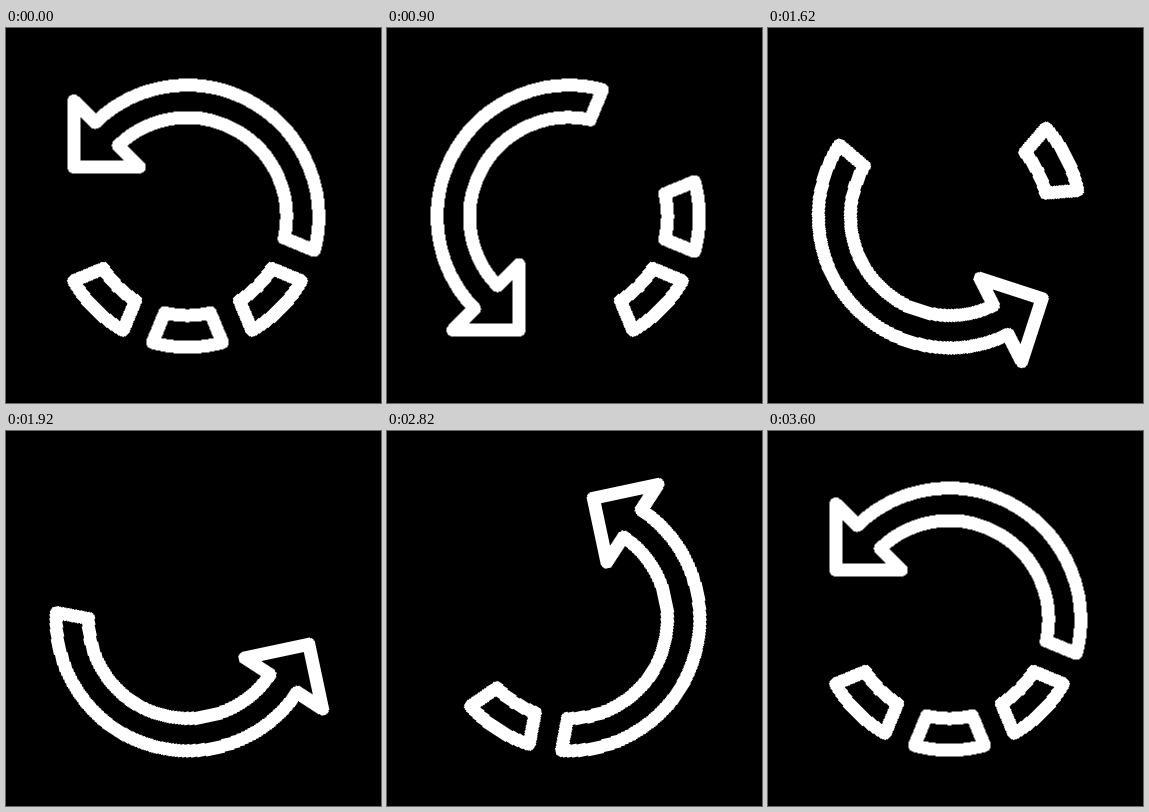
These frames come from a looping animation (375 px wide and 375 px high, 3.63 s). An HTML page:

```html
<!DOCTYPE html>
<html lang="en">
<head>
<meta charset="utf-8">
<title>Rotating arrow</title>
<style>
  html, body { margin: 0; width: 100%; height: 100%; overflow: hidden; background: #000; }
  svg { display: block; width: 100%; height: 100%; }
  path { fill: none; stroke: #fff; stroke-width: 13; stroke-linejoin: round; shape-rendering: crispEdges; }

  /* 120 turns of 3 degrees, 30 ms each, plus one rest step */
  .wheel { transform-origin: 0 0; animation: turn 3.63s steps(121) -2ms infinite; }
  .dash { animation: 3.63s step-end -2ms infinite; }
  .first { animation-name: first; }
  .second { animation-name: second; }
  .third { animation-name: third; }

  @keyframes turn { from { transform: rotate(0deg); } to { transform: rotate(-363deg); } }
  @keyframes first { 0%, 67.769% { opacity: 1; } 19.835% { opacity: 0; } 100% { opacity: 1; } }
  @keyframes second { 0%, 81.818% { opacity: 1; } 35.537% { opacity: 0; } 100% { opacity: 1; } }
  @keyframes third { 0%, 96.694% { opacity: 1; } 51.24% { opacity: 0; } 100% { opacity: 1; } }
</style>
</head>
<body>
<svg viewBox="0 0 375 375">
  <defs>
    <path id="dash" d="M-35 126A130.8 130.8 0 0 0 35 126L22.8 96.4A99 99 0 0 1-22.8 96.4Z"/>
  </defs>
  <g transform="translate(181.5 188.5)">
    <g class="wheel">
      <path d="M-113.5-115.5L-92.1-93.9A131.5 131.5 0 0 1 126.8 34L96.8 21.5A99.2 99.2 0 0 0-69.2-70.9L-48-49.5H-113.5Z"/>
      <use class="dash first" href="#dash" transform="rotate(-45)"/>
      <use class="dash second" href="#dash"/>
      <use class="dash third" href="#dash" transform="rotate(45)"/>
    </g>
  </g>
</svg>
</body>
</html>
```
